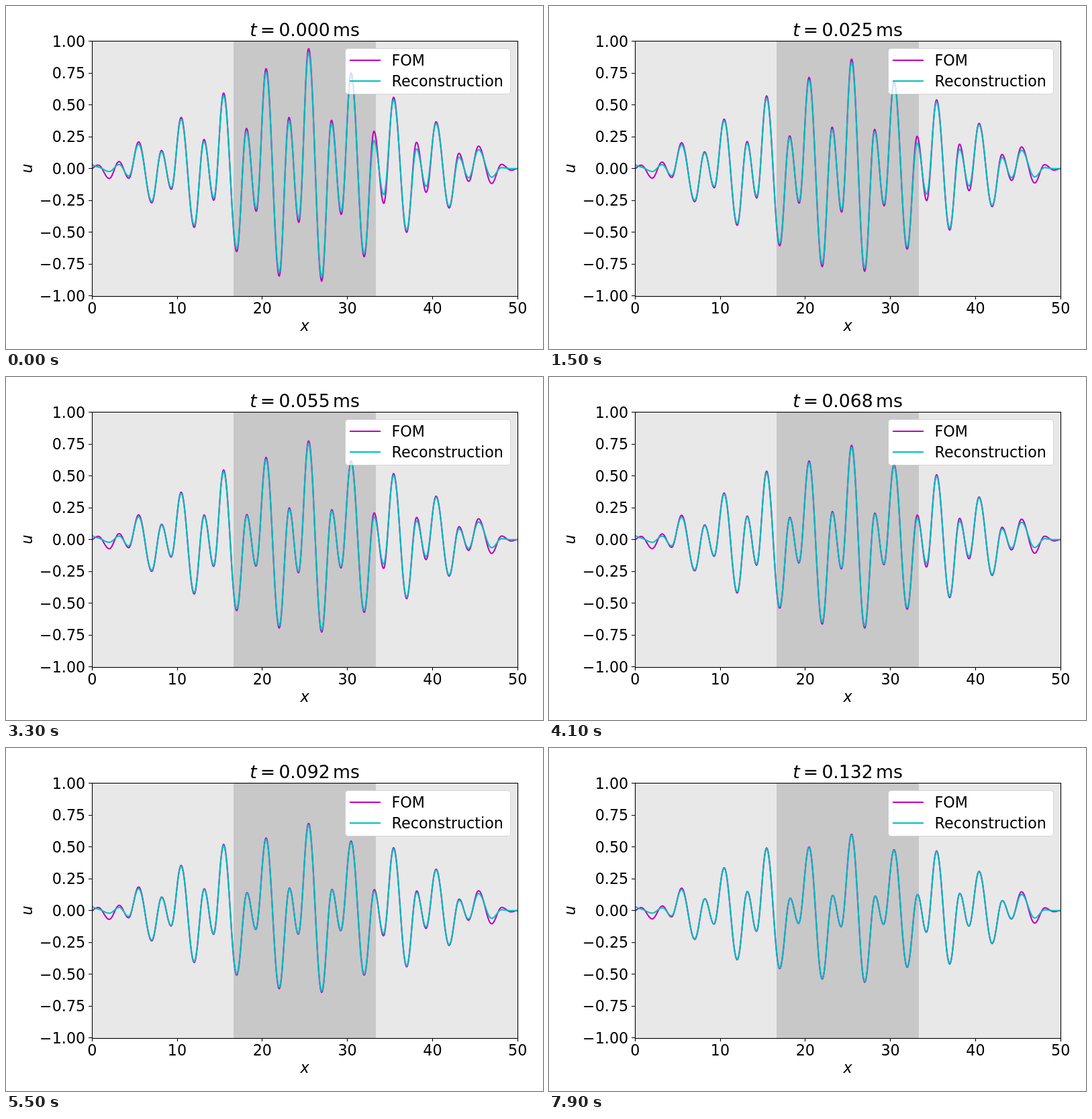
Write an HTML page that moves like this. It is 800 by 512 pixels and loops after 8000 ms.

```html
<!DOCTYPE html>
<html lang="en">
<head>
<meta charset="utf-8">
<title>Wave reconstruction</title>
<style>
  html, body { margin: 0; width: 100%; height: 100%; overflow: hidden; background: #fff; }
  svg { display: block; font: 22.22px "DejaVu Sans", sans-serif; }
  .math { font-style: italic; }
  .title { font-size: 26.67px; }
  .curve { fill: none; stroke-width: 2.08; stroke-linejoin: round; }
  .key { stroke-linecap: square; }
  .full { stroke: #bf00bf; }
  .recon { stroke: #00bfbf; }
  .axis { fill: none; stroke: #000; stroke-width: 1.1; }
</style>
</head>
<body>
<svg width="800" height="512" viewBox="0 0 800 512">
  <rect x="128" y="52" width="634" height="381" fill="#e8e8e8"/>
  <rect x="339" y="52" width="212" height="381" fill="#c8c8c8"/>
  <rect x="505.5" y="63.5" width="246" height="68" rx="4.4" fill="#fff"/>
  <path id="full" class="curve full"/>
  <path id="recon" class="curve recon"/>
  <rect class="axis" x="128.5" y="52.5" width="634" height="381"/>
  <g id="ticks"></g>
  <text class="math" x="445" y="485" text-anchor="middle">x</text>
  <text class="math" transform="translate(39 242.5) rotate(-90)" text-anchor="middle">u</text>
  <g class="title">
    <text class="math" x="363.2" y="45">t</text>
    <text x="378.8" y="45">=</text>
    <text id="time" x="406.4" y="45">0.000</text>
    <text x="487" y="45">ms</text>
  </g>
  <rect x="505.5" y="63.5" width="246" height="68" rx="4.4" fill="#fff" stroke="#ccc" opacity=".8"/>
  <path class="curve key full" d="M513 81H557"/>
  <path class="curve key recon" d="M513 112H557"/>
  <text x="574.6" y="89">FOM</text>
  <text x="574.6" y="120">Reconstruction</text>
</svg>
<script>
const $ = id => document.getElementById(id);
const px = x => 128.2 + x * 12.68;
const py = u => 242.7 - u * 190.2;
const mix = (a, b, p) => a + (b - a) * p;
const PERIOD = 4.992;

// 1 in the dark middle band, 0 outside, with a soft border
const inMiddle = x => 1 / (1 + Math.exp((Math.abs(x - 25) - 25 / 3) / .4));

// Each period has a big peak and trough, then a small pair that draws together.
// Sizes follow a triangle and decay faster in the middle band.
function turningPoints(s, gain) {
  const points = [[-.4, -.012 * gain(0, true)]];
  for (let i = 0; i < 40; i++) {
    const small = i % 4 > 1;
    const offset = [.48, 2.02, 3.17, 4.32][i % 4];
    const x = i ? PERIOD * Math.floor(i / 4) + offset : .72;
    const middle = inMiddle(x);
    const drift = small ? mix(.04, .08, middle) * s : 0;
    const decay = small ? mix(.655, .3, middle) : mix(.838, .636, middle);
    const size = (small ? .0174 : .0384) * Math.min(x, 50 - x) * decay ** (s ** (small ? 1.05 : .96));
    const sign = i % 2 ? -1 : 1;
    points.push([x + sign * drift, sign * size * gain(x, small)]);
  }
  return [...points, [50, 0]];
}

// The reconstruction starts too flat, most of all at the ends and in the right band
function reconGain(s) {
  return (x, small) => {
    const start = !small ? .965 : x > 33 ? .75 : .93;
    const edge = 1 - Math.exp(-((Math.min(x, 50 - x) / 3.2) ** 2));
    return edge * mix(start, .99, s);
  };
}

// Half a cosine between neighbouring turning points, lifted at the left end
function curve(points, lift) {
  let d = "", k = 0;
  for (let n = 0; n <= 634; n++) {
    const x = n * 50 / 634;
    while (k < points.length - 2 && x > points[k + 1][0]) k++;
    const [[x0, u0], [x1, u1]] = points.slice(k, k + 2);
    const p = Math.min(1, (x - x0) / (x1 - x0));
    const u = mix(u0, u1, (1 - Math.cos(Math.PI * p)) / 2) + lift * Math.exp(-1.5 * x);
    d += (n ? "L" : "M") + px(x).toFixed(2) + " " + py(u).toFixed(2);
  }
  return d;
}

let ticks = "";
for (let x = 0; x <= 50; x += 10) {
  const at = Math.floor(px(x)) + .5;
  ticks += `<path class="axis" d="M${at} 433v5"/><text x="${px(x)}" y="459" text-anchor="middle">${x}</text>`;
}
for (let i = -4; i <= 4; i++) {
  const y = py(i / 4), at = Math.floor(y) + .5;
  const label = (i < 0 ? "\u2212" : "") + Math.abs(i / 4).toFixed(2);
  ticks += `<path class="axis" d="M123 ${at}h5"/><text x="118.2" y="${y + 8}" text-anchor="end">${label}</text>`;
}
$("ticks").innerHTML = ticks;

let shown = -1;
function draw() {
  const step = Math.floor(performance.now() / 100) % 80;
  if (step !== shown) {
    shown = step;
    const s = step / 79;
    $("full").setAttribute("d", curve(turningPoints(s, () => 1), 0));
    $("recon").setAttribute("d", curve(turningPoints(s, reconGain(s)), .033));
    $("time").textContent = (step / 600).toFixed(3);
  }
  requestAnimationFrame(draw);
}
draw();
</script>
</body>
</html>
```
